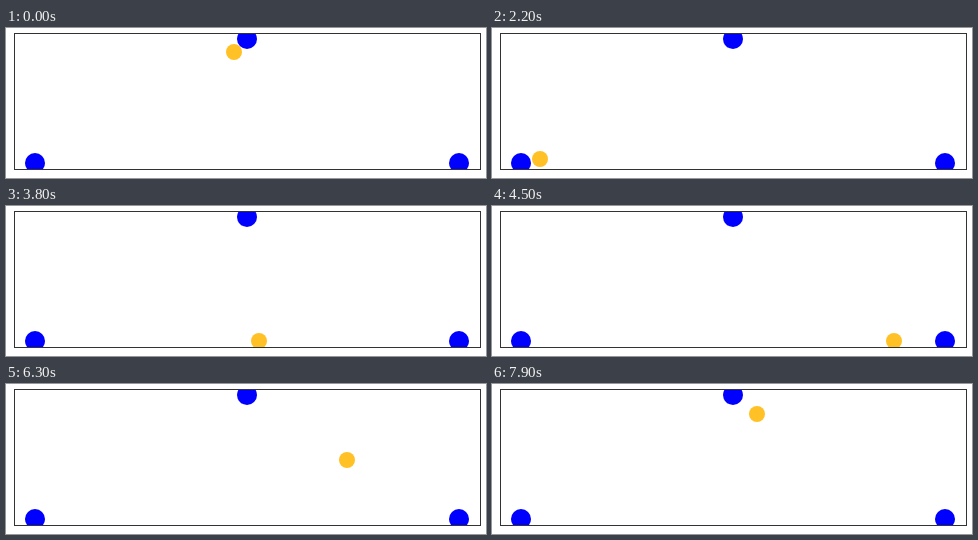
Recreate the animation shown at these times as an HTML page. Size 480 px wide and 150 px high, loop 8 s.

```html
<!DOCTYPE html>
<html lang="en">
<head>
<meta charset="utf-8">
<title>Ball on a triangle</title>
<style>
  html, body { margin: 0; width: 100%; height: 100%; overflow: hidden; background: #fff; }
  svg { display: block; }
</style>
</head>
<body>
<svg width="480" height="150">
  <clipPath id="inside"><rect x="9" y="6" width="465" height="135"/></clipPath>
  <g clip-path="url(#inside)">
    <circle id="ball" r="8" fill="#ffc125"/>
    <g fill="#00f">
      <circle cx="241" cy="11" r="10"/>
      <circle cx="29" cy="135" r="10"/>
      <circle cx="453" cy="135" r="10"/>
    </g>
  </g>
  <rect x="8.5" y="5.5" width="466" height="136" fill="none" stroke="#333"/>
</svg>
<script>
  const LOOP = 8000, LEG = 2500, STEP = 100;
  const topLeft = [228.5, 24.08], left = [42.2, 135.45];
  const right = [440.4, 135.45], topRight = [254.1, 24.08];
  const stops = [topLeft, left, right, topRight, right];
  const ball = document.getElementById('ball');
  const swing = p => 0.5 - Math.cos(p * Math.PI) / 2;

  function draw() {
    const time = Math.floor(performance.now() % LOOP / STEP) * STEP;
    const leg = Math.floor(time / LEG);
    const progress = swing(time % LEG / LEG);
    const [from, to] = [stops[leg], stops[leg + 1]];
    // The ball sits on whole pixels
    const [x, y] = from.map((a, i) => Math.floor(a + (to[i] - a) * progress));
    ball.setAttribute('cx', x);
    ball.setAttribute('cy', y);
    requestAnimationFrame(draw);
  }
  draw();
</script>
</body>
</html>
```
